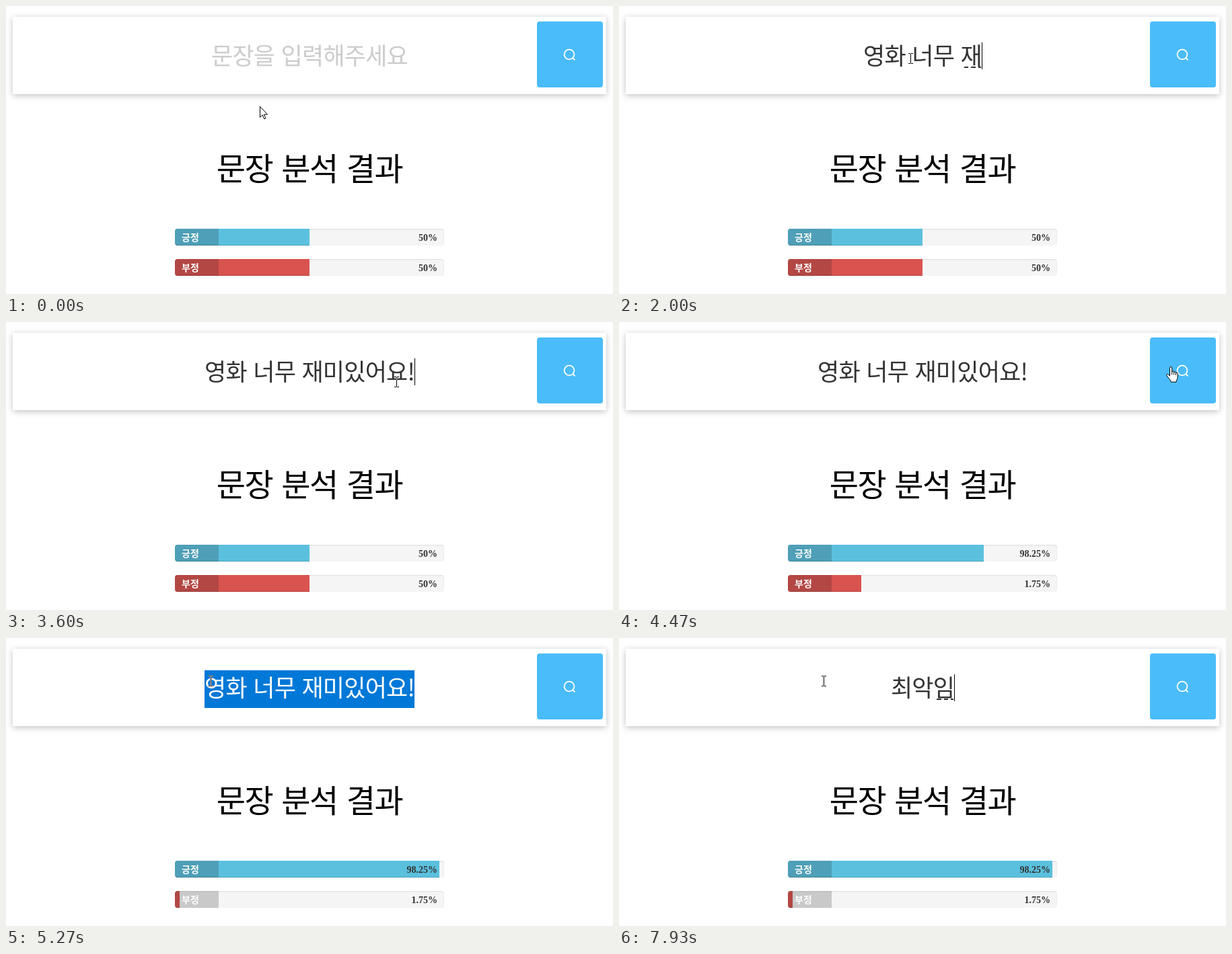
These frames come from a looping animation (902 px wide and 428 px high, 8 s). An HTML page:

```html
<!DOCTYPE html>
<html lang="ko">
<head>
<meta charset="utf-8">
<title>문장 분석</title>
<style>
  html, body { margin: 0; width: 100%; height: 100%; overflow: hidden; background: #fff; }
  #stage { position: absolute; inset: 0; width: 902px; height: 428px; overflow: hidden; background: #fff;
    font-family: "Noto Sans CJK KR", "Noto Sans CJK", sans-serif; }
  #stage > *, .bar > * { position: absolute; }
  .card { left: 10px; top: 16px; width: 882px; height: 115px; background: #fff; box-shadow: 0 2px 9px rgba(0,0,0,.25); }
  .button { left: 789px; top: 23px; width: 98px; height: 98px; border-radius: 4px; background: #4abcfa; }
  .button svg { position: absolute; left: 39px; top: 39px; fill: none; stroke: #fff; stroke-width: 1.8; }
  .line { left: 0; top: 44px; width: 902px; height: 56px; display: flex; justify-content: center;
    font-size: 35px; line-height: 56px; letter-spacing: -.8px; word-spacing: .4px; white-space: pre; color: #333; }
  #hint { color: #ccc; }
  #field { position: relative; isolation: isolate; height: 56px; }
  #composing, #selected { position: relative; }
  #composing:not(:empty)::after { content: ""; position: absolute; left: 5px; right: 1px; top: 44px; height: 2px;
    background: repeating-linear-gradient(90deg, #333 0 6.5px, transparent 6.5px 10.5px); }
  #selected { color: #fff; }
  #selected:not(:empty)::before { content: ""; position: absolute; z-index: -1; left: 0; right: 0; top: 2px; height: 56px; background: #0078d7; }
  #caret { position: absolute; left: 100%; top: 10px; width: 1px; height: 40px; background: #000; }
  h1 { left: 0; top: 209px; width: 902px; margin: 0; text-align: center; font-weight: 400; font-size: 47px;
    line-height: 60px; letter-spacing: -1.45px; word-spacing: 1.2px; color: #000; }
  .bar { left: 251px; width: 400px; height: 25px; border-radius: 4px; overflow: hidden; background: #f5f5f5;
    box-shadow: inset 0 1px 2px rgba(0,0,0,.1); font-weight: 700; font-size: 14px; line-height: 25px; }
  .fill { left: 0; top: 0; height: 25px; box-shadow: inset 0 -1px rgba(0,0,0,.15); }
  .label { left: 0; top: 0; width: 55px; height: 25px; padding-left: 10px; background: rgba(25,25,25,.2); color: #fff; }
  .value { right: 10px; top: 1px; color: #333; font-family: "Liberation Serif", "Times New Roman", serif; }
  .cursor { left: 0; top: 0; overflow: visible; fill: #fff; }
  #beam { mix-blend-mode: difference; }
  #arrow, #hand { stroke: #000; stroke-linejoin: round; }
</style>
</head>
<body>
<div id="stage">
  <div class="card"></div>
  <div class="button">
    <svg width="20" height="20"><circle cx="9" cy="10" r="7.4"/><path d="M14.2 15.2l3.3 3.3"/></svg>
  </div>
  <div class="line" id="hint">문장을 입력해주세요</div>
  <div class="line"><div id="field"><span id="plain"></span><span id="composing"></span><span id="selected"></span><i id="caret"></i></div></div>
  <h1>문장 분석 결과</h1>
  <div class="bar" style="top:331px">
    <div class="fill" style="background:#5bc0de"></div><div class="label">긍정</div><div class="value"></div>
  </div>
  <div class="bar" style="top:376px">
    <div class="fill" style="background:#d9534f"></div><div class="label">부정</div><div class="value"></div>
  </div>
  <svg class="cursor" id="arrow" width="12" height="19"><path d="M.5.5v16l3.7-3.6 2.6 6 2.2-1-2.6-5.7h5.2z"/></svg>
  <svg class="cursor" id="beam" width="7" height="16"><path d="M-3-8h3v1h-3zM1-8h3v1h-3zM0-7h1v14h-1zM-3 7h3v1h-3zM1 7h3v1h-3z"/></svg>
  <svg class="cursor" id="hand" width="18" height="24"><g transform="translate(-7 -1)">
    <path d="M5.5 14V2.2a1.6 1.6 0 0 1 3.2 0v6.3a1.5 1.5 0 0 1 3 .2v.5a1.4 1.4 0 0 1 2.8.3v.6a1.4 1.4 0 0 1 2.7.3V15c0 4-2 5-2.2 8.2H7.5C7 20 3 17 1 13.8c-1-1.8.8-3 2.3-1.6z"/>
    <path d="M8.7 8.5v4M11.7 9v3.5M14.5 10v3"/></g></svg>
</div>
<script>
const $ = id => document.getElementById(id);
const LOOP = 8000, TICK = 1000 / 15;
const A = '영화 ', B = A + '너무 ', C = B + '재미있', FULL = C + '어요!';

// [tick, plain, composing, selected]
const typing = [
  [0, ''],
  [12, '', 'ㅇ'], [13, '', '여'], [15, '', '영'], [17, '영', 'ㅎ'], [18, '영', '호'], [19, '영', '화'], [21, A],
  [23, A, 'ㄴ'], [24, A, '너'], [25, A, '넘'], [26, A + '너', '무'], [27, B],
  [29, B, 'ㅈ'], [30, B, '재'], [34, B, '잼'], [35, B + '재', '미'],
  [37, B + '재', '밍'], [38, B + '재미', '이'], [40, B + '재미', '있'],
  [43, C, 'ㅇ'], [44, C, '어'], [45, C, '엉'], [46, C + '어', '요'], [50, FULL],
  [77, FULL.slice(0, 9), '', FULL.slice(9)], [78, A, '', FULL.slice(3)], [79, '', '', FULL],
  [97, '', 'ㅊ'], [98, '', '초'], [100, '', '최'],
  [109, '최', 'ㅇ'], [110, '최', '아'], [111, '최', '악'],
  [116, '최악', 'ㅇ'], [118, '최악', '이'], [119, '최악', '임']
];
const caretOn = [[4, 58], [97, 108], [109, 120]];

// [tick, x, y] of the pointer's hot spot
const path = [
  [0, 377, 149], [1, 384, 142], [2, 405, 112], [3, 427, 84], [4, 433, 78],
  [51, 433, 78], [53, 500, 86], [55, 660, 91], [57, 800, 80], [59, 820, 67],
  [67, 820, 67], [74, 682, 74], [75, 682, 74], [76, 630, 70], [77, 520, 68], [78, 375, 66], [79, 304, 64]
];
const bars = [...document.querySelectorAll('.bar')].map(el => ({
  fill: el.querySelector('.fill'), value: el.querySelector('.value')
}));
const results = [98.25, 1.75], FILL_START = 4299, FILL_TIME = 600;

const bezier = (s, a, b) => 3 * (1 - s) ** 2 * s * a + 3 * (1 - s) * s * s * b + s ** 3;

// CSS "ease"
function ease(x) {
  if (x <= 0) return 0;
  if (x >= 1) return 1;
  let lo = 0, hi = 1;
  for (let i = 0; i < 24; i++) {
    const mid = (lo + hi) / 2;
    if (bezier(mid, .25, .25) < x) lo = mid; else hi = mid;
  }
  return bezier(lo, .1, 1);
}

function pointAt(tick) {
  const next = path.findIndex(p => p[0] > tick);
  if (next < 0) return path[path.length - 1].slice(1);
  const a = path[next - 1], b = path[next], f = (tick - a[0]) / (b[0] - a[0]);
  return [1, 2].map(i => Math.round(a[i] + (b[i] - a[i]) * f));
}

function drawField(tick) {
  const [, plain, composing = '', selected = ''] = typing.filter(s => s[0] <= tick).pop();
  $('plain').textContent = plain;
  $('composing').textContent = composing;
  $('selected').textContent = selected;
  $('hint').style.visibility = plain + composing + selected ? 'hidden' : 'visible';
  $('caret').style.visibility = caretOn.some(([a, b]) => tick >= a && tick < b) ? 'visible' : 'hidden';
}

function drawBars(time) {
  const f = ease((time - FILL_START) / FILL_TIME);
  bars.forEach((bar, i) => {
    bar.fill.style.width = 50 + (results[i] - 50) * f + '%';
    bar.value.textContent = (f > 0 ? results[i] : 50) + '%';
  });
}

function drawCursor(tick) {
  const [x, y] = pointAt(tick);
  const kind = y > 131 ? 'arrow' : x >= 789 ? 'hand' : 'beam';
  for (const id of ['arrow', 'beam', 'hand']) {
    const style = $(id).style;
    style.display = id === kind ? 'block' : 'none';
    style.left = x + 'px';
    style.top = y + 'px';
  }
}

let shown = -1;
function draw(now) {
  const tick = Math.floor((now % LOOP + 3.4) / TICK) % 120;
  if (tick !== shown) {
    shown = tick;
    drawField(tick);
    drawBars(tick * TICK);
    drawCursor(tick);
  }
}

const start = performance.now();
function loop() {
  draw(performance.now() - start);
  requestAnimationFrame(loop);
}
loop();
</script>
</body>
</html>
```
